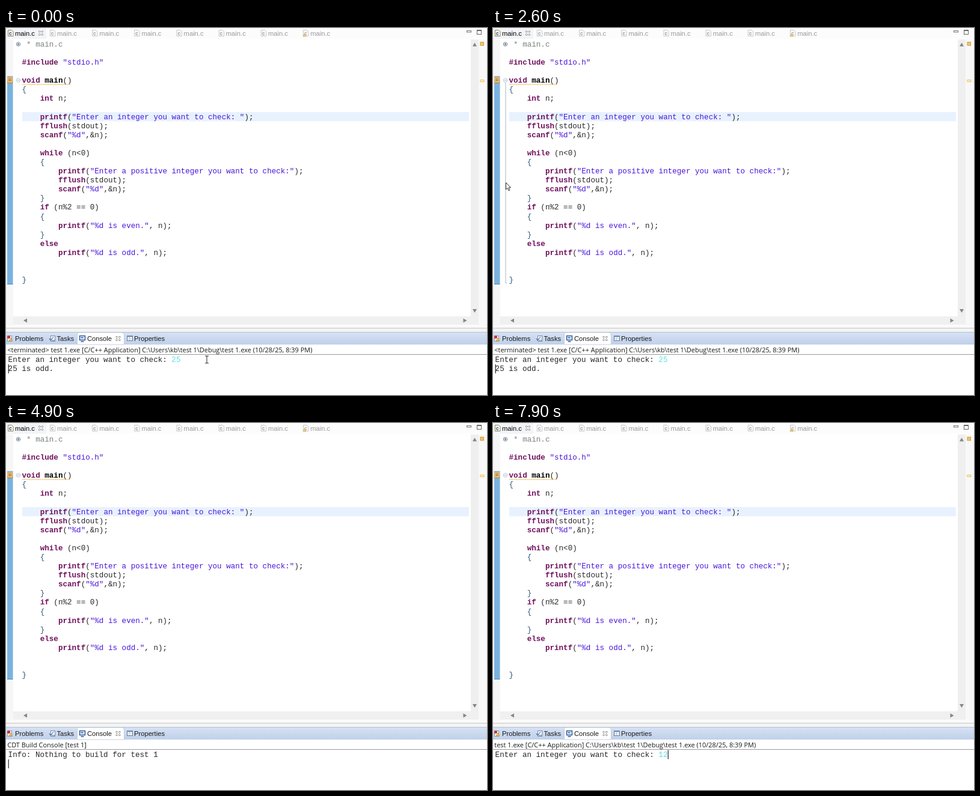
An HTML page that plays this animation: 800 px wide and 611 px high, repeating every 8 s.

```html
<!DOCTYPE html>
<html lang="en">
<head>
<meta charset="utf-8">
<title>Even or odd</title>
<style>
html, body { margin: 0; width: 100%; height: 100%; overflow: hidden; background: #fff; }
svg { display: block; width: 100%; height: 100%; }
text { white-space: pre; }
.code { font: 12.58px "Liberation Mono", monospace; fill: #2a2626; }
.ui { font: 11.2px "Liberation Sans", sans-serif; fill: #1a1a1a; }
.head { font: 10.94px "Open Sans", sans-serif; fill: #1a1a1a; }
.key { font-weight: bold; fill: #70105c; }
.main { font-weight: bold; fill: #000; }
.str { fill: #4a14dc; }
.note { fill: #7b837d; }
.brace { fill: #2f5878; }
.in { fill: #62dfdc; }
</style>
</head>
<body>
<svg id="stage" viewBox="0 0 800 611"></svg>
<script>
const LOOP = 8000;
const stage = document.getElementById("stage");

const esc = s => s.replace(/&/g, "&amp;").replace(/</g, "&lt;").replace(/>/g, "&gt;");
const rect = (x, y, w, h, fill, extra = "") =>
  `<rect x="${x}" y="${y}" width="${w}" height="${h}" fill="${fill}" ${extra}/>`;
const path = (d, stroke, fill = "none", width = 1) =>
  `<path d="${d}" stroke="${stroke}" fill="${fill}" stroke-width="${width}"/>`;
const text = (x, y, cls, s, extra = "") =>
  `<text x="${x}" y="${y}" class="${cls}" ${extra}>${s}</text>`;

// Source listing
const program = [
  " * main.c", "", '#include "stdio.h"', "", "void main()", "{", "    int n;", "",
  '    printf("Enter an integer you want to check: ");',
  "    fflush(stdout);", '    scanf("%d",&n);', "",
  "    while (n<0)", "    {",
  '        printf("Enter a positive integer you want to check:");',
  "        fflush(stdout);", '        scanf("%d",&n);', "    }",
  "    if (n%2 == 0)", "    {", '        printf("%d is even.", n);', "    }",
  "    else", '        printf("%d is odd.", n);', "", "", "}"
];

function highlight(line) {
  if (line.startsWith(" *")) return `<tspan class="note">${line}</tspan>`;
  const token = /("[^"]*")|(#include|\b(?:void|int|while|if|else|printf|fflush|scanf)\b)|(\bmain\b)|([{}])/g;
  const kinds = ["str", "key", "main", "brace"];
  let html = "", at = 0;
  for (const m of line.matchAll(token)) {
    const cls = kinds[m.slice(1).findIndex(Boolean)];
    html += esc(line.slice(at, m.index)) + `<tspan class="${cls}">${esc(m[0])}</tspan>`;
    at = m.index + m[0].length;
  }
  return html + esc(line.slice(at));
}

// Icons
const fileIcon = (x, active) => {
  const edge = active ? "#8d8258" : "#c9c9c9", ink = active ? "#173f7d" : "#9a9fa8";
  return path(`M${x + .5} 3.5h6l2.5 2.5v7.5h-8.5z`, edge, active ? "#fffdf2" : "#fafafa") +
    `<text x="${x + 2}" y="11.6" font-family="Liberation Sans, sans-serif" font-size="8.5" font-weight="bold" fill="${ink}">c</text>`;
};
const closeIcon = (x, y) =>
  path(`M${x - 3.5} ${y - 3.5}h2l1.5 2l1.5 -2h2v1.5l-2 2l2 2v1.5h-2l-1.5 -2l-1.5 2h-2v-1.5l2 -2l-2 -2z`, "#777", "#fff", .8);
const foldIcon = (y, color, plus) =>
  `<circle cx="20.5" cy="${y}" r="3.2" fill="#fff" stroke="${color}" stroke-width=".8"/>` +
  path(`M18.5 ${y}h4` + (plus ? `M20.5 ${y - 2}v4` : ""), color, "none", 1);
const triangle = (x, y, dx, dy) => {
  const p = dx ? `M${x + 3 * dx} ${y}l${-6 * dx} -3.5v7z` : `M${x} ${y + 3 * dy}l-3.5 ${-6 * dy}h7z`;
  return `<path d="${p}" fill="#858585"/>`;
};

function editor() {
  let s = rect(0, 0, 800, 611, "#fff") + rect(0, 0, 800, 18, "#fcfcfc") + rect(0, 0, 67, 18, "#f3f4f7");
  s += fileIcon(3, true) + text(15, 12.6, "ui", "main.c", 'style="fill:#000"') + closeIcon(58, 8.5);
  for (let i = 0; i < 7; i++) {
    const x = 72.8 + i * 70.2;
    s += fileIcon(x, false) + text(x + 12.2, 12.6, "ui", "main.c", 'style="fill:#999"');
  }
  s += path("M494 14l2.5 -4l2.5 4z", "#d9a441", "#f6d27a", .8);
  s += rect(766.5, 4.5, 7, 2.5, "#fff", 'stroke="#666" stroke-width=".9"');
  s += rect(783.5, 3.5, 7, 7, "#fff", 'stroke="#666"') + rect(783, 3, 8, 2, "#666");

  // Rulers and scroll bars
  s += rect(0, 19, 12, 476, "#f6f6f6") + rect(2, 80, 9.5, 347, "#7ab2e0") + path("M2 426.5h9.5", "#4d88bd");
  s += rect(773, 19, 13, 461, "#efefef") + rect(786, 19, 14, 476, "#f8f8f8");
  s += rect(12, 480, 774, 14, "#f0f0f0");
  s += triangle(779.5, 27.5, 0, -1) + triangle(779.5, 471, 0, 1);
  s += triangle(32, 487, -1, 0) + triangle(763.5, 487, 1, 0);
  s += rect(789, 23.5, 5.5, 5.5, "#f3c56c", 'stroke="#cf9a3c"');
  s += rect(789, 86.5, 6, 3, "#fff3cf", 'stroke="#e9bd5c"');

  s += rect(27, 140, 743, 15.3, "#e8f2fe");
  s += program.map((line, i) => line && text(26.5, 31 + i * 15.08, "code", highlight(line))).join("");
  let wave = "M26.5 94.5";
  for (let i = 0; i < 20; i++) wave += "l2 -1l2 1";
  s += path(wave, "#f0b950", "none", 1);
  s += foldIcon(27, "#50657c", true) + foldIcon(87, "#a9b8c8", false);
  s += rect(2, 81, 9, 11, "#d9b07a") + path("M2.5 91.5l4 -8l4.5 8z", "#b97a24", "#fbd889", .9) +
    path("M6.6 86v3M6.6 90v1", "#5a3a10");
  return s;
}

function panel() {
  let s = rect(0, 495, 800, 12, "#f4f4f4") + rect(0, 495, 800, 4, "#fafafa") + path("M0 499.8h800", "#c4c4c4");
  s += path("M0 506.5h800", "#b4bfd0") + rect(0, 507, 800, 20, "url(#bar)");
  s += `<path d="M118.5 527v-17q0 -3 3 -3h71q4 0 4 4v16z" fill="#fff" stroke="#b7c4da" stroke-width=".8"/>`;
  s += rect(2.5, 512.5, 7, 9, "#fff", 'stroke="#8794ab"') + `<circle cx="4.5" cy="514.5" r="2.6" fill="#c9343f"/>` +
    path("M5 521l3 -5l3 5z", "#c28a2b", "#f1c45c", .8);
  s += rect(74.5, 512.5, 7, 9, "#fff", 'stroke="#7b8798"') + path("M72 517l2.5 3l4.5 -6M76 520h5", "#476fa5", "none", 1.2);
  s += rect(122.5, 512.5, 9, 7, "#dcebff", 'stroke="#2f568f" stroke-width="1.4"') + path("M124.5 522h5M124.5 515.5h4", "#2f568f", "none", 1.3);
  s += rect(201.5, 512.5, 9, 8, "#fff", 'stroke="#66758c"') + rect(201, 512, 10, 2.5, "#6f8fbd") + path("M201.5 517.5h9M205.5 514v6", "#a9b4c4", "none", .7);
  [[15, "Problems"], [84.5, "Tasks"], [135, "Console"], [213, "Properties"]]
    .forEach(([x, name]) => s += text(x, 521.2, "ui", name));
  return s + closeIcon(186.5, 517) + path("M0 543.5h800", "#9a9a9a");
}

stage.innerHTML =
  `<defs><linearGradient id="bar" x2="0" y2="1"><stop stop-color="#d6e1f3"/><stop offset="1" stop-color="#bfd0ea"/></linearGradient></defs>` +
  editor() + panel() +
  `<g id="fold">${path("M21 91v333.5h2", "#a9b4c4")}</g>` +
  text(2.3, 540, "head", "", 'id="title"') +
  text(3.6, 556.2, "code", "", 'id="row1"') + text(3.6, 571.2, "code", "", 'id="row2"') +
  `<rect id="caret" width="1.2" height="15" fill="#222"/>` +
  `<g id="beam">${path("M-3 -6h2.2l.8 .8l.8 -.8h2.2M0 -5v10M-3 6h2.2l.8 -.8l.8 .8h2.2", "#333", "none", 1.1)}</g>` +
  `<g id="arrow">${path("M.5 .5v11.5l2.6 -2.4l2 4.4l1.9 -.9l-2 -4.2h3.6z", "#333", "#fff", 1)}</g>`;

const el = Object.fromEntries(["fold", "title", "row1", "row2", "caret", "beam", "arrow"]
  .map(id => [id, document.getElementById(id)]));
const show = (node, on) => node.setAttribute("visibility", on ? "visible" : "hidden");
const put = (node, s) => { if (node.dataset.s !== s) node.innerHTML = node.dataset.s = s; };

// Pointer way points: time, x, y
const way = [
  [0, 334, 552], [500, 334, 552], [1000, 190, 566], [1400, 62, 588], [1540, 42, 600],
  [1700, 37, 575], [2150, 28, 420], [2600, 21, 257], [2900, 21, 225], [3200, 34, 120],
  [3600, 62, -20], [5150, 150, -20], [5500, 220, 250], [5950, 288, 550], [6300, 292, 558], [LOOP, 292, 558]
];

function pointer(t) {
  const i = way.findIndex(p => p[0] > t);
  const [t0, x0, y0] = way[i - 1], [t1, x1, y1] = way[i];
  const k = (t - t0) / (t1 - t0);
  return [x0 + (x1 - x0) * k, y0 + (y1 - y0) * k];
}

const run = esc("test 1.exe [C/C++ Application] C:\\Users\\kb\\test 1\\Debug\\test 1.exe (10/28/25, 8:39 PM)");
const prompt = "Enter an integer you want to check: ";
const BUILD = 4600, START = 5300, ASK = 5500, KEY1 = 7800, KEY2 = 7900;

function consoleAt(t) {
  if (t < BUILD) return {
    title: "&lt;terminated&gt; " + run, row1: prompt + '<tspan class="in">25</tspan>', row2: "25 is odd.",
    x: 3.6, y: 560, since: -450
  };
  if (t < START) return {
    title: "CDT Build Console [test 1]", row1: "Info: Nothing to build for test 1", row2: "", x: 3.6, y: 560, since: BUILD
  };
  const typed = t < KEY1 ? "" : t < KEY2 ? "1" : "12";
  const asked = t >= ASK;
  return {
    title: run, row1: asked ? `${prompt}<tspan class="in">${typed}</tspan>` : "", row2: "",
    x: asked ? 275.6 + 7.55 * typed.length : 3.6, y: 544.5, since: typed ? KEY1 : 5400
  };
}

function draw(t) {
  const c = consoleAt(t);
  put(el.title, c.title);
  put(el.row1, c.row1);
  put(el.row2, c.row2);
  el.caret.setAttribute("x", c.x);
  el.caret.setAttribute("y", c.y);
  show(el.caret, (t - c.since) % 1000 < 500);

  const [x, y] = pointer(t);
  const inText = y > 544 || (y > 19 && y < 480 && x > 26);
  const visible = t < KEY1 && y > -16;
  for (const node of [el.beam, el.arrow]) node.setAttribute("transform", `translate(${x} ${y})`);
  show(el.beam, visible && inText);
  show(el.arrow, visible && !inText);
  show(el.fold, x > 13 && x <= 26 && y > 19 && y < 480);
}

const begin = performance.now();
function tick() {
  draw((performance.now() - begin) % LOOP);
  requestAnimationFrame(tick);
}
tick();
</script>
</body>
</html>
```
